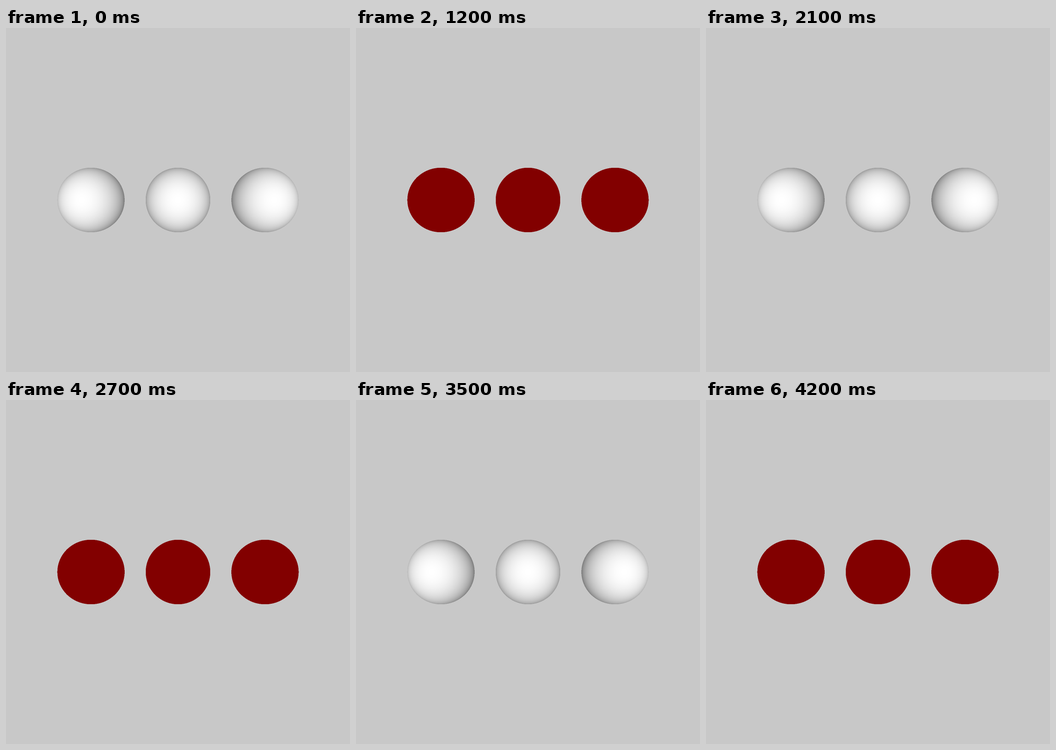
Write an HTML page with a canvas that moves like this. It is 748x748 px and loops after 4300 ms.

```html
<!DOCTYPE html>
<html>
<head>
<meta charset="utf-8">
<style>
html, body { margin: 0; width: 100%; height: 100%; overflow: hidden; background: #c8c8c8; }
canvas { display: block; }
</style>
</head>
<body>
<canvas id="stage" width="748" height="748"></canvas>
<script>
const SIZE = 748, LOOP = 4300, BACK = 200;
const RADIUS = 69.8, GAP = SIZE / 4;
const EYE = SIZE / 2 / Math.tan(Math.PI / 6); // 60 degree field of view
const TOGGLES = [1200, 2100, 2700, 3500, 4200]; // the light goes off, on, off...
const SUB = [0.25, 0.75]; // samples inside a pixel
const ctx = document.getElementById('stage').getContext('2d');

// Facing (z of the normal) of the sphere at cx under screen point x, y; null if missed.
function facing(cx, x, y) {
  const a = x * x + y * y + EYE * EYE;
  const b = x * cx + EYE * EYE;
  const c = cx * cx + EYE * EYE - RADIUS * RADIUS;
  const disc = b * b - a * c;
  if (disc < 0) return null;
  const t = (b - Math.sqrt(disc)) / a;
  return (EYE - t * EYE) / RADIUS;
}

// Ambient light plus one light along the view axis.
function lit(nz) {
  const v = 128 + 127 * Math.max(0, nz);
  return [v, v, v];
}

const flat = () => [130, 0, 0];

function pixel(cx, col, row, shade) {
  const sum = [0, 0, 0];
  let hits = 0;
  for (const dy of SUB) {
    for (const dx of SUB) {
      const nz = facing(cx, col + dx - SIZE / 2, row + dy - SIZE / 2);
      if (nz !== null) hits++;
      const rgb = nz === null ? [BACK, BACK, BACK] : shade(nz);
      rgb.forEach((v, i) => sum[i] += v / 4);
    }
  }
  return hits ? sum : null;
}

function render(shade) {
  const img = ctx.createImageData(SIZE, SIZE);
  const px = img.data.fill(BACK);
  for (let i = 3; i < px.length; i += 4) px[i] = 255;
  for (const cx of [-GAP, 0, GAP]) {
    const mid = SIZE / 2 + cx;
    for (let row = 300; row < 448; row++) {
      for (let col = mid - 80; col < mid + 80; col++) {
        const rgb = pixel(cx, col, row, shade);
        if (rgb) px.set(rgb.map(Math.round), (row * SIZE + col) * 4);
      }
    }
  }
  return img;
}

const white = render(lit), red = render(flat);
const start = performance.now();
let shown = null;

function draw(now) {
  const t = Math.max(0, now - start) % LOOP;
  const flips = TOGGLES.filter(at => at <= t).length;
  const next = flips % 2 ? red : white;
  if (next !== shown) ctx.putImageData(shown = next, 0, 0);
}

function tick() {
  draw(performance.now());
  requestAnimationFrame(tick);
}
tick();
</script>
</body>
</html>
```
